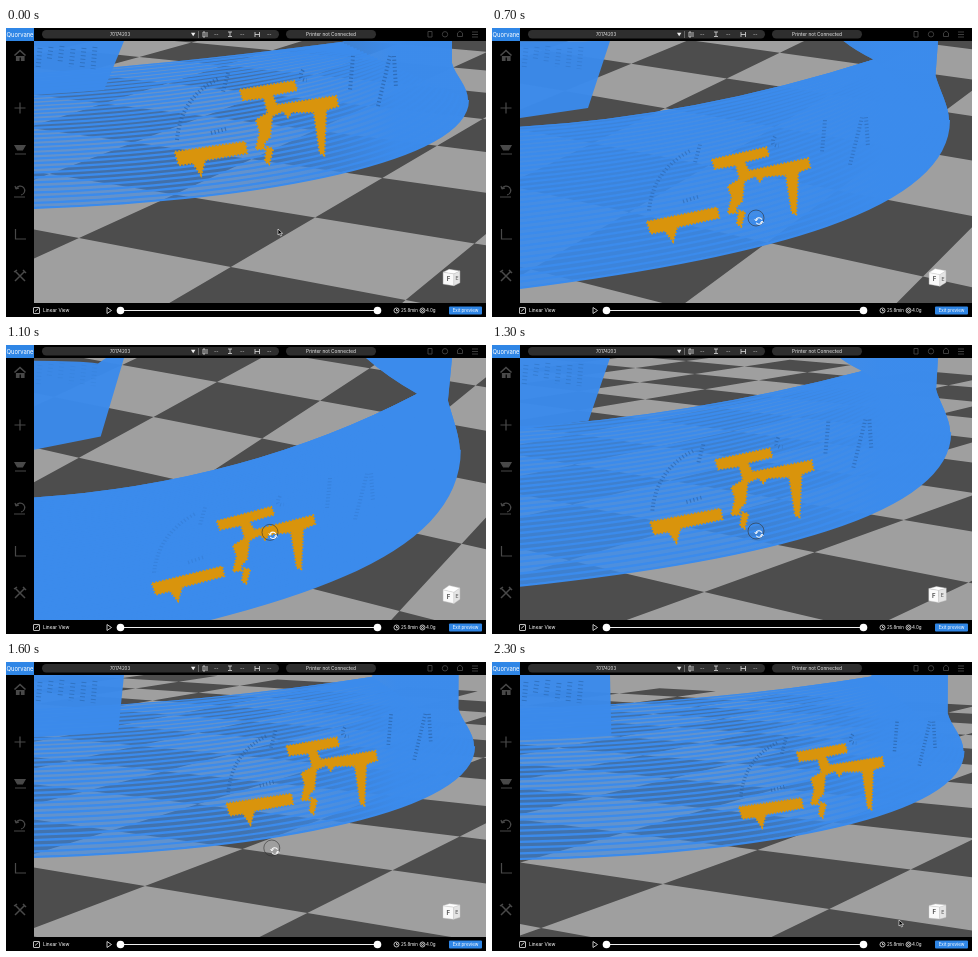
Animation, 480 px wide and 289 px high, one loop 2400 ms. Source, as an HTML page:

```html
<!DOCTYPE html>
<html lang="en">
<head>
<meta charset="utf-8">
<title>Print preview</title>
<style>
html, body { margin: 0; width: 100%; height: 100%; overflow: hidden; background: #000; }
svg { display: block; width: 480px; height: 289px; font-family: Inter, Arial, sans-serif; }
</style>
</head>
<body>
<svg viewBox="0 0 480 289">
  <defs>
    <clipPath id="view"><rect x="28" y="13" width="452" height="262"/></clipPath>
    <clipPath id="ringClip"><path id="ringShape"/></clipPath>
    <linearGradient id="fade" gradientUnits="userSpaceOnUse" x1="240" x2="390" y1="0" y2="0">
      <stop stop-color="#3b8bec" stop-opacity="0"/>
      <stop offset="1" stop-color="#3b8bec" stop-opacity=".97"/>
    </linearGradient>
  </defs>
  <rect width="480" height="289"/>
  <g clip-path="url(#view)">
    <rect x="28" y="13" width="452" height="262" fill="#9f9f9f"/>
    <path id="floor" fill="#4d4d4d"/>
    <g clip-path="url(#ringClip)">
      <rect id="base" width="480" height="289" fill="#3b8bec"/>
      <path id="layers" fill="none" stroke="#3b8bec" stroke-width="2.3"/>
      <rect width="480" height="289" fill="url(#fade)"/>
    </g>
    <path id="rim" fill="none" stroke="#3b8bec" stroke-width="2"/>
    <path id="wall" fill="#3b8bec" fill-opacity=".97"/>
    <path id="wallMarks" fill="none" stroke="#2d6db8" stroke-width="5" stroke-dasharray="1 2.6"/>
    <g id="print">
      <path id="marks" fill="none" stroke="#2a62a5" stroke-width="4" stroke-dasharray="1.2 2.4"
        d="M-62 48Q-58 5 -21 -13M-11 -19L-16 0M64 -22Q58 -12 68 -12M114 -36L111 -2M139 14L151 -36M155 -36L157 -4M-28 41L-13 37"/>
      <path fill="#d9940c" stroke="#d9940c" stroke-width="2.4" stroke-dasharray="1.6 1.8"
        d="M1 -2L55 -11L58 -2L33 3L38 13L97 4L99 14L87 18L85 63L81 61L75 20L53 20L49 25L44 19L33 24L31 45L25 51L25 57L17 57L21 40L17 28L29 21L25 6L4 8Z
           M-64 60L6 50L8 61L-34 68L-38 83L-46 71L-60 73Z M28 55L34 57L30 72L26 69Z"/>
    </g>
    <g id="cube" stroke="#ccc" stroke-width=".4"></g>
    <text id="cubeF" font-size="6" font-weight="700" fill="#555" text-anchor="middle">F</text>
    <text id="cubeE" font-size="5" font-weight="700" fill="#777" text-anchor="middle">E</text>
    <circle id="halo" r="8" fill="none" stroke="#333" stroke-width=".8"/>
    <path id="arrow" d="M0 0V6L1.5 4.7L2.5 7L3.6 6.5L2.6 4.3H4.6Z" stroke="#fff" stroke-width=".6"/>
    <g id="spin" fill="none" stroke="#fff" stroke-width="1.1">
      <circle r="3.2" stroke-dasharray="8 2"/>
      <path d="M-4.5 -2L-2.8 0L-1.2 -2M4.5 2L2.8 0L1.2 2" stroke-width=".7"/>
    </g>
  </g>

  <rect width="28" height="13" fill="#2f86e6"/>
  <text x="14" y="8.6" font-size="5.8" fill="#fff" text-anchor="middle">Quorvane</text>
  <g fill="#2e2e2e">
    <rect x="36" y="2" width="237" height="8.5" rx="4.2"/>
    <rect x="280" y="2" width="90" height="8.5" rx="4.2"/>
  </g>
  <g font-size="4.8" fill="#eee">
    <text x="114" y="8" text-anchor="middle" font-size="4.4">70174203</text>
    <path d="M185 4.8H189.4L187.2 8.3Z"/>
    <text x="208" y="8">--</text><text x="234" y="8">--</text><text x="261" y="8">--</text>
    <text x="325" y="8" text-anchor="middle">Printer not Connected</text>
  </g>
  <g fill="none" stroke="#ddd" stroke-width=".8">
    <path d="M192.5 3V10" stroke="#777"/>
    <path d="M197 4H199V9H197ZM201 4V9M222 4H226M222 8.5H226M224 4V8M249 4V9M253.5 4V9M249 6.5H253.5"/>
  </g>
  <g fill="none" stroke="#3c3c3c">
    <path d="M422 3.5H426V9H422Z"/><circle cx="439" cy="6.3" r="2.7"/>
    <path d="M451.5 8.5V5L454 3L456.500 5V8.500ZM466 4H472M466 6.5H472M466 9H472"/>
  </g>
  <g fill="none" stroke="#494949" stroke-width="1.2">
    <path d="M8.5 27.5L14 22.5L19.5 27.5" stroke-width="1.6"/>
    <path d="M10.5 28V32.5H13V29H15.5V32.5H18V28" fill="#494949"/>
    <path d="M14 74.5V85.5M8.5 80H19.5"/>
    <path d="M9 117.5H19L16.5 122H11.5ZM9 126H20" fill="#494949"/>
    <path d="M10 161A4.5 4.5 0 1 1 15 167M10 161L9 158M10 161L13 160M8 169H19"/>
    <path d="M9.5 201V211H20"/>
    <path d="M9 243L19 253M19 243L9 253M8 244L11 242M17 242L20 245" stroke-width="1.5"/>
  </g>
  <g fill="none" stroke="#eee" stroke-width=".8">
    <rect x="27.5" y="279.5" width="6" height="6" rx=".5"/>
    <path d="M29 283.5L32.5 280.5M101 279.5L105.5 282.5L101 285.5Z"/>
    <path d="M115 282.5H371" stroke-width="1.2"/>
    <circle cx="390.5" cy="282.5" r="2.5"/><path d="M390.5 281V282.7H392"/>
    <circle cx="416.5" cy="282.5" r="2.5"/><circle cx="416.5" cy="282.5" r="1"/>
  </g>
  <g fill="#fff" font-size="4.5">
    <circle cx="114.5" cy="282.5" r="3.8"/><circle cx="371.5" cy="282.5" r="3.8"/>
    <rect x="443" y="278.5" width="33" height="8" rx="1" fill="#2f86e6"/>
    <text x="37" y="284.3" font-size="4.8">Linear View</text>
    <text x="395" y="284.3">25.8min</text>
    <text x="420" y="284.3">4.0g</text>
    <text x="459.5" y="284.3" text-anchor="middle">Exit preview</text>
  </g>
</svg>
<script>
const $ = id => document.getElementById(id);
const set = (id, attrs) => { for (const k in attrs) $(id).setAttribute(k, attrs[k]); };
const LOOP = 2400, STEP = 100;

// lift raises the camera, slide turns the model to the right;
// floor: screen x, y of one tile corner, yaw, pitch, depth
const key = (time, lift, slide, ...floor) => ({ time, values: [lift, slide, ...floor] });
const views = [
  key(0, 0, 0, 73, 210, 61, 15.4, 7.11),
  key(600, 0, 0, 73, 210, 61, 15.4, 7.11),
  key(800, 1, 0, 5, 273, 61, 25, 7.22),
  key(1100, .82, 0, 5, 258, 61, 23.5, 7.22),
  key(1300, .38, 0, -66, 257, 52, 12.3, 6.33),
  key(1600, .05, 6, 139, 224, 59, 11.5, 6.75),
  key(1800, .04, 9, 171, 222, 59, 10.3, 6.7),
  key(LOOP, .04, 9, 171, 222, 59, 10.3, 6.7)
];
const point = (time, ...values) => ({ time, values });
const pointer = [point(0, 272, 201), point(500, 264, 186), point(700, 267, 193),
  point(1300, 267, 189), point(1800, 270, 189), point(2300, 407, 258), point(LOOP, 407, 258)];

const mix = (a, b, k) => a.map((v, i) => v + (b[i] - v) * k);
function sample(keys, t) {
  const i = keys.findIndex(k => t < k.time), a = keys[i - 1], b = keys[i];
  return mix(a.values, b.values, (t - a.time) / (b.time - a.time));
}
const fix = p => p.map(v => v.toFixed(1)).join(" ");
const poly = pts => "M" + pts.map(fix).join("L") + "Z";

function axes(yaw, pitch) {
  const r = Math.PI / 180, s = Math.sin(yaw * r), c = Math.cos(yaw * r);
  const sp = Math.sin(pitch * r), cp = Math.cos(pitch * r);
  return { u: [c, -s * sp, s * cp], v: [s, c * sp, -c * cp], rise: cp };
}

function drawFloor(x, y, yaw, pitch, depth) {
  const FOCAL = 1250, CX = 254, CY = 144, { u, v } = axes(yaw, pitch);
  const origin = [(x - CX) / FOCAL * depth, (y - CY) / FOCAL * depth, depth];
  const at = (i, j) => {
    const [px, py, pz] = origin.map((o, n) => o + i * u[n] + j * v[n]);
    return [CX + FOCAL * px / pz, CY + FOCAL * py / pz];
  };
  let d = "";
  for (let i = -3; i < 10; i++)
    for (let j = -8; j < 5; j++)
      if ((i + j) % 2 === 0) d += poly([at(i, j), at(i + 1, j), at(i + 1, j + 1), at(i, j + 1)]);
  set("floor", { d });
}

function drawRing(lift, slide) {
  const rise = lift ** 1.4, sink = 1.7 * slide, right = 446 + 1.1 * slide;
  const left = [28, 45 + 142 * rise];
  const bend = [150 + 110 * lift + 8 * slide, 38 + 132 * rise];
  const tip = [335 + 93 * lift + 4.5 * slide, 14 + 46 * rise];
  const topX = 338 + 27 * lift + 4.5 * slide;
  const neck = [right - 5 * lift, 35 + 25 * lift + sink];
  const edge = [right + 16 - 10 * lift, 72 + 40 * lift + sink];
  const lower = [...edge, edge[0], 133 + 97 * lift + sink,
    260 + 30 * lift + 2 * slide, 172 + 113 * lift + sink, 28, 180 + 160 * lift + sink * .7];
  const upper = [...tip, ...mix(tip, bend, 2 / 3), ...mix(left, bend, 2 / 3), ...left];
  const curve = c => `M${fix(c.slice(0, 2))}C${fix(c.slice(2))}`;

  set("ringShape", { d: `M${fix(left)}Q${fix([...bend, ...tip])}` +
    `Q${fix([tip[0] * .4 + topX * .6, tip[1] / 2 + 7, topX, 13])}H${right}L${fix(neck)}` +
    `C${fix([neck[0] + 3, neck[1] + 12, edge[0], edge[1] - 14, ...edge])}C${fix(lower.slice(2))}Z` });
  let d = "";
  for (let k = 0; k <= 1; k += 1 / 32) d += curve(mix(lower, upper, 1.25 * k - .25 * k * k));
  set("layers", { d });
  set("rim", { d: curve(lower) });
  set("base", { "fill-opacity": .58 + .42 * Math.min(1, lift * 1.5) });
}

function drawWall(lift, slide) {
  const dip = 9 * lift ** 6, top = 13 + dip, bottom = 62 + 36 * lift + slide;
  set("wall", { d: `M28 ${top}Q72 ${top} 92 ${13 + dip * 2}L100 13H118` +
    `L${fix([98 - 4 * lift + 2.4 * slide, bottom])}L28 ${bottom + 5 + 10 * lift}Z` });
  let d = "";
  for (let x = 34; x < 92; x += 11) d += `M${x} ${18 + x % 4}l-2 ${14 + x % 9}`;
  set("wallMarks", { d, opacity: .8 * (1 - lift) });
}

function drawPrint(lift, slide) {
  const size = 1 - .0125 * slide, tilt = .14 * lift;
  const x = 233 - 28 * lift + 8 * slide, y = 64 + 139 * lift + 2.5 * slide;
  set("print", { transform: `matrix(${size} ${-tilt * size} 0 ${size * (1 - tilt)} ${x} ${y})` });
  set("marks", { opacity: .7 * (1 - lift * lift) });
}

function drawCube(yaw, pitch) {
  const { u, v, rise } = axes(yaw, pitch);
  const at = (a, b, h) => [445.5 + 6.2 * (a * u[0] + b * v[0]), 249.5 + 6.2 * (a * u[1] + b * v[1] - h * rise)];
  const face = (fill, ...pts) => `<path d="${poly(pts)}" fill="${fill}"/>`;
  $("cube").innerHTML =
    face("#fafafa", at(-1, -1, 1), at(-1, 1, 1), at(-1, 1, -1), at(-1, -1, -1)) +
    face("#e4e4e4", at(-1, 1, 1), at(1, 1, 1), at(1, 1, -1), at(-1, 1, -1)) +
    face("#fff", at(-1, -1, 1), at(-1, 1, 1), at(1, 1, 1), at(1, -1, 1));
  const label = (id, [x, y]) => set(id, { x, y: y + 2 });
  label("cubeF", at(-1, 0, 0));
  label("cubeE", at(0, 1, 0));
}

function drawPointer(t) {
  const [x, y] = sample(pointer, t), turning = t >= 700 && t < 1800;
  const transform = `translate(${x} ${y})`, offset = turning ? 3 : 1;
  set("arrow", { transform, opacity: turning ? 0 : 1 });
  set("spin", { transform, opacity: turning ? 1 : 0 });
  set("halo", { cx: x - offset, cy: y - offset, opacity: t >= 500 && t < 1800 ? .75 : 0 });
}

function draw(t) {
  const [lift, slide, ...floor] = sample(views, t);
  drawFloor(...floor);
  drawRing(lift, slide);
  drawWall(lift, slide);
  drawPrint(lift, slide);
  drawCube(floor[2], floor[3]);
  drawPointer(t);
}

const start = performance.now();
function tick() {
  const t = (performance.now() - start) % LOOP;
  draw(Math.floor(t / STEP) * STEP);
  requestAnimationFrame(tick);
}
tick();
</script>
</body>
</html>
```
